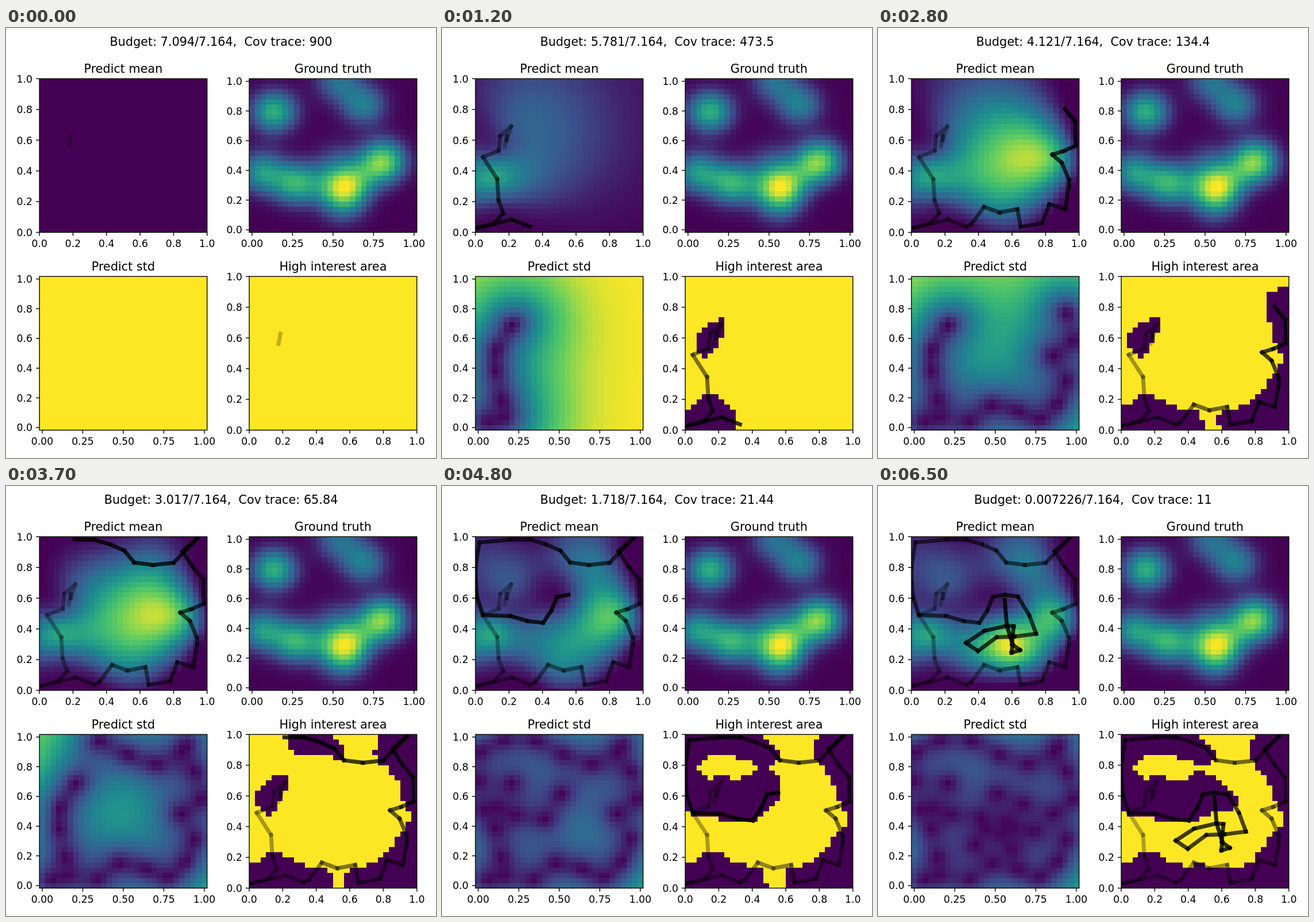
Recreate the animation shown at these times as an HTML page with a canvas. Size 748 by 748 pixels, loop 6.6 s.

```html
<!DOCTYPE html>
<html lang="en">
<head>
<meta charset="utf-8">
<title>Path planning with a Gaussian process</title>
<style>
  html, body { margin: 0; height: 100%; overflow: hidden; background: #fff; }
  canvas { display: block; }
</style>
</head>
<body>
<canvas id="stage" width="748" height="748"></canvas>
<script>
const ctx = document.getElementById('stage').getContext('2d');
const N = 30, BUDGET = 7.164, STEP = 0.2, LENGTH_SCALE = 0.45, BUMP = 0.1;
const PANEL_W = 291.6, PANEL_H = 267.3, HALF_CELL = 0.5 / (N - 1);

const distance = (a, b) => Math.hypot(a[0] - b[0], a[1] - b[1]);
const mix = (a, b, t) => a + (b - a) * t;
const clamp = (v, lo, hi) => Math.min(Math.max(v, lo), hi);
const short = v => String(+v.toPrecision(4));

// Catmull-Rom curve through the keys; u counts keys.
function spline(keys, u) {
  const last = keys.length - 1, i = clamp(Math.floor(u), 0, last - 1), t = u - i;
  const [a, b, c, d] = [-1, 0, 1, 2].map(k => keys[clamp(i + k, 0, last)]);
  return keys[0].map((_, k) => b[k] + t / 2 * (c[k] - a[k]
    + t * (2 * a[k] - 5 * b[k] + 4 * c[k] - d[k] + t * (3 * (b[k] - c[k]) + d[k] - a[k]))));
}

const stops = [[68, 1, 84], [59, 82, 139], [33, 145, 140], [94, 201, 98], [253, 231, 37]];
const palette = Array.from({ length: 256 }, (_, i) => spline(stops, i / 255 * 4));
const colour = v => palette[Math.round(clamp(v, 0, 1) * 255)];

// Corners of the route; a trailing 1 adds a rounded stop on the way there.
const corners = [
  [.175, .561], [.186, .628], [.187, .6], [.213, .69], [.148, .627], [.138, .532], [.045, .49],
  [.13, .346], [.138, .208], [.165, .124], [.11, .058], [.01, .029], [.216, .083], [.327, .037],
  [.357, .054], [.433, .166], [.526, .129], [.632, .151], [.652, .036], [.78, .06], [.822, .183],
  [.917, .15], [.94, .3], [.94, .342], [.897, .452], [.84, .506], [.98, .564, 1], [.977, .72],
  [.915, .803], [.853, .905], [.943, .99], [.8, .83], [.565, .832, 1], [.506, .91], [.33, .98, 1],
  [.21, .981], [.023, .963], [0, .8], [.01, .604, 1], [.045, .49], [.208, .484], [.404, .44, 1],
  [.486, .608, 1], [.555, .622], [.635, .61], [.744, .368, 1], [.616, .35], [.508, .346],
  [.397, .256], [.325, .309], [.435, .387], [.569, .421], [.61, .417], [.6, .3, 1],
  [.648, .262], [.597, .245], [.603, .3], [.569, .421], [.556, .59]
];
const route = corners.flatMap(([x, y, rounded], i) =>
  rounded ? [spline(corners, i - 0.5), [x, y]] : [[x, y]]);

// Key readings: step, remaining budget, covariance trace.
const readings = [
  [0, 7.094, 900], [12, 5.781, 473.5], [18, 5.159, 312], [28, 4.121, 134.4],
  [37, 3.017, 65.84], [48, 1.718, 21.44], [65, .007226, 11]
];

// The true field is a sum of equal-width bumps: x, y, height.
const bumps = [
  [.135, .795, .65], [.69, .84, .43], [.53, 1, .36], [.06, .385, .54], [.27, .31, .62], [.44, .32, .15],
  [.57, .28, .8], [.56, .15, .2], [.52, .47, .17], [.68, .37, .22], [.81, .46, .8]
];
const field = p => bumps.reduce((sum, b) => sum + b[2] * Math.exp(-((distance(p, b) / BUMP) ** 2) / 2), 0);
const cells = Array.from({ length: N * N }, (_, i) => [i % N / (N - 1), Math.floor(i / N) / (N - 1)]);
const peak = Math.max(...cells.map(field));
const truth = cells.map(c => field(c) / peak);

// Segment lengths, fitted to the budget readings.
const lengths = route.slice(1).map((p, i) => distance(p, route[i]));
let first = 0, left = BUDGET;
for (const [last, budget] of readings) {
  const raw = lengths.slice(first, last + 1).reduce((a, b) => a + b);
  for (; first <= last; first++) lengths[first] *= (left - budget) / raw;
  left = budget;
}

// A measurement is taken each STEP along the route.
const samples = [], counts = [], remaining = [];
let travelled = 0;
lengths.forEach((len, i) => {
  let next;
  while ((next = (samples.length + 1) * STEP) < travelled + len) {
    const t = (next - travelled) / len;
    samples.push([0, 1].map(k => mix(route[i][k], route[i + 1][k], t)));
  }
  travelled += len;
  counts.push(samples.length);
  remaining.push(BUDGET - travelled);
});

function kernel(a, b) {
  const k = Math.sqrt(3) * distance(a, b) / LENGTH_SCALE;
  return (1 + k) * Math.exp(-k);
}

// Condition the process on one sample after another and keep every state.
const points = [...cells, ...samples];
const basis = [], states = [];
let mean = points.map(() => 0), variance = points.map(() => 1);
const keep = () => states.push({
  mean: mean.slice(0, N * N),
  std: variance.slice(0, N * N).map(v => Math.sqrt(Math.max(v, 0))),
  trace: variance.slice(0, N * N).reduce((a, b) => a + b)
});
keep();
samples.forEach((s, j) => {
  const at = N * N + j;
  const cov = points.map((p, i) => basis.reduce((c, b) => c - b[at] * b[i], kernel(s, p)));
  const scale = Math.sqrt(cov[at] + 1e-10);
  const b = cov.map(c => c / scale);
  const error = (field(s) / peak - mean[at]) / scale;
  basis.push(b);
  mean = mean.map((m, i) => m + b[i] * error);
  variance = variance.map((v, i) => v - b[i] * b[i]);
  keep();
});

// Trace after n samples, calibrated by the readings.
const calibration = readings.map(([step, , trace]) => [counts[step], trace / states[counts[step]].trace]);
function traceOf(n) {
  const k = Math.max(1, calibration.findIndex(c => c[0] >= n));
  const [n0, r0] = calibration[k - 1], [n1, r1] = calibration[k];
  return states[n].trace * mix(r0, r1, (n - n0) / (n1 - n0));
}

const tile = document.createElement('canvas');
tile.width = tile.height = N;
const tileCtx = tile.getContext('2d'), pixels = tileCtx.createImageData(N, N);

function text(str, x, y, size, align) {
  ctx.font = size + 'px "DejaVu Sans", sans-serif';
  ctx.textAlign = align;
  ctx.fillText(str, x, y);
}

function line(x0, y0, x1, y1) {
  ctx.beginPath();
  ctx.moveTo(x0, y0);
  ctx.lineTo(x1, y1);
  ctx.stroke();
}

// With a path the axes span 0 to 1; without one they span all whole cells.
// The cells reach `edge` beyond the unit square.
function panel(x, y, title, values, path, edge = HALF_CELL) {
  const margin = path ? 0 : 1 / 60, span = 1 - 2 * margin;
  const px = u => x + PANEL_W * (margin + span * u);
  const py = v => y + PANEL_H * (1 - margin - span * v);

  values.forEach((v, i) => {
    const at = 4 * ((N - 1 - Math.floor(i / N)) * N + i % N);
    pixels.data.set([...colour(v), 255], at);
  });
  tileCtx.putImageData(pixels, 0, 0);

  ctx.save();
  ctx.beginPath();
  ctx.rect(x, y, PANEL_W, PANEL_H);
  ctx.clip();
  ctx.imageSmoothingEnabled = false;
  ctx.drawImage(tile, px(-edge), py(1 + edge), px(1 + edge) - px(-edge), py(-edge) - py(1 + edge));
  if (path) {
    ctx.lineWidth = 6.93;
    ctx.lineCap = 'square';
    for (let i = 0; i < path.length - 1; i++) {
      const [a, b] = [path[i], path[i + 1]];
      ctx.globalAlpha = 0.25 + 0.6 * i / path.length;
      line(px(a[0]), py(a[1]), px(b[0]), py(b[1]));
    }
  }
  ctx.restore();

  ctx.lineWidth = 1.4;
  ctx.strokeRect(x, y, PANEL_W, PANEL_H);
  const bottom = y + PANEL_H, parts = path ? 5 : 4;
  for (let i = 0; i <= parts; i++) {
    const u = i / parts;
    line(px(u), bottom, px(u), bottom + 6);
    text(u.toFixed(path ? 1 : 2), px(u), bottom + 25.3, 17.3, 'center');
  }
  for (let i = 0; i <= 5; i++) {
    line(x, py(i / 5), x - 6, py(i / 5));
    text((i / 5).toFixed(1), x - 12.1, py(i / 5) + 6.4, 17.3, 'right');
  }
  text(title, x + PANEL_W / 2, y - 10.4, 20.78, 'center');
}

function draw(step) {
  const n = counts[step], { mean, std } = states[n];
  const path = route.slice(0, step + 2);
  const interest = mean.map((m, i) => m + std[i] >= 0.4 ? 1 : 0);
  ctx.fillStyle = '#fff';
  ctx.fillRect(0, 0, 748, 748);
  ctx.fillStyle = ctx.strokeStyle = '#000';
  text(`Budget: ${short(remaining[step])}/${BUDGET},  Cov trace: ${short(traceOf(n))}`, 374, 30.6, 20.78, 'center');
  panel(58.2, 88.2, 'Predict mean', mean, path);
  panel(423.1, 88.2, 'Ground truth', truth);
  panel(58.2, 432.2, 'Predict std', std);
  panel(423.1, 432.2, 'High interest area', interest, path, 0);
}

let shown = -1;
function tick() {
  const step = Math.floor(performance.now() % 6600 / 100);
  if (step !== shown) draw(shown = step);
  requestAnimationFrame(tick);
}
tick();
</script>
</body>
</html>
```
